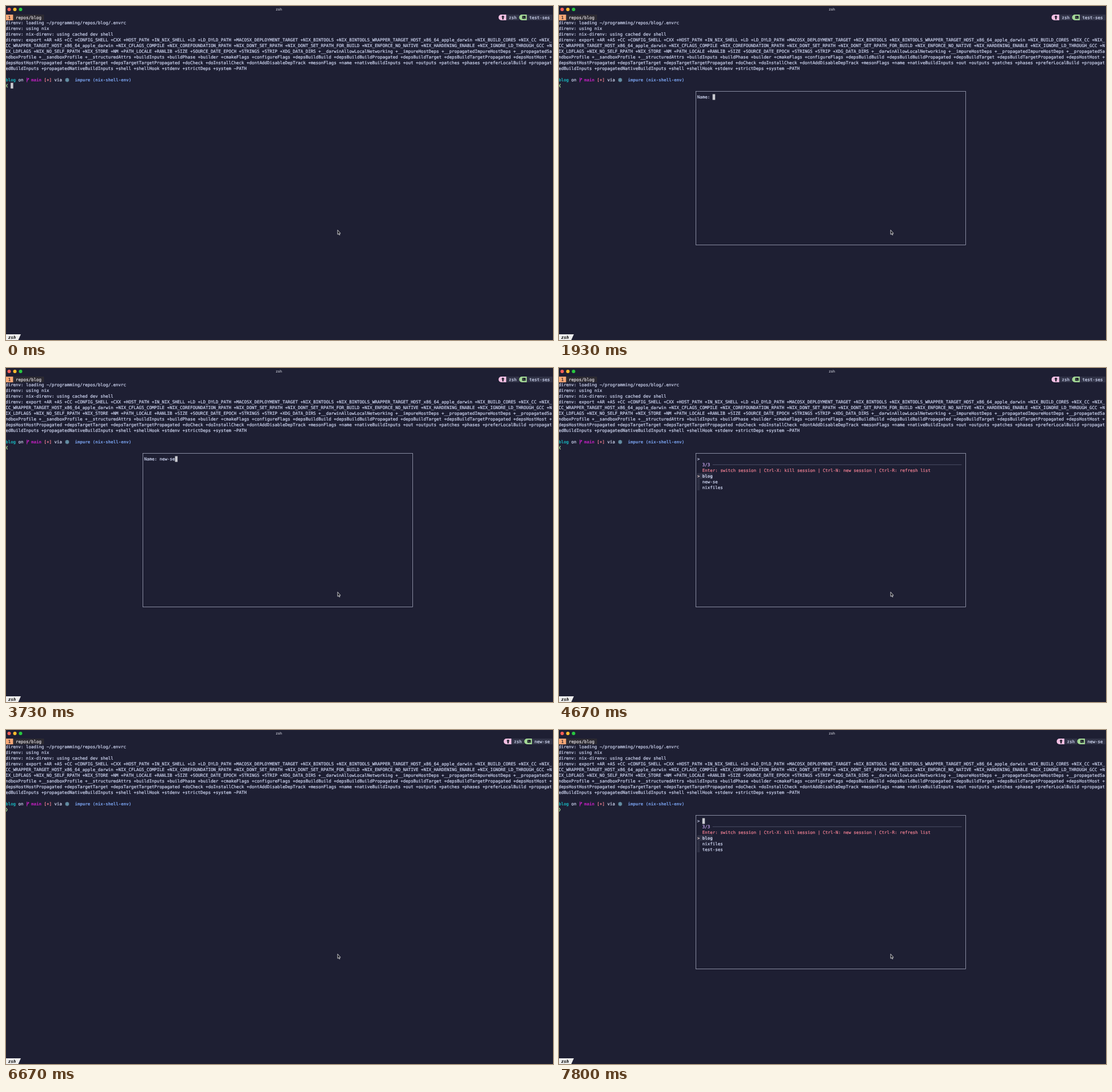
These frames come from a looping animation (957x585 px, 8 s). An HTML page:

```html
<!DOCTYPE html>
<html lang="en">
<head>
<meta charset="utf-8">
<title>Terminal sessions</title>
<style>
html, body { margin: 0; width: 100%; height: 100%; overflow: hidden; background: #1e1f33; }
svg { display: block; width: 957px; height: 585px; }
text { font: 7.462px "DejaVu Sans Mono", "Noto Sans Mono", monospace; white-space: pre; text-rendering: geometricPrecision; }
.cell { stroke-width: .2; }
.b { font-weight: bold; stroke-width: 0; }
.tab { font-weight: bold; font-style: italic; }
.title { font: 600 6.4px Inter, Roboto, sans-serif; }
</style>
</head>
<body>
<svg id="stage" viewBox="0 0 957 585" xmlns="http://www.w3.org/2000/svg">
  <g id="base"></g>
  <g id="live"></g>
  <path id="pointer" d="M580.2 392.3V400.2L581.9 398.6L583 401.2L584.2 400.7L583.1 398.2H585.2Z" fill="#15151c" stroke="#eee" stroke-width=".8"/>
</svg>
<script>
const LOOP = 8000, CW = 4.4925, RH = 9.953;
const C = {
  bg: '#1e1f33', fg: '#d0d7f2', box: '#313347', sel: '#2e3044', gutter: '#2e3044',
  mauve: '#c9a8f0', red: '#f28094', cyan: '#18b4bc', purple: '#c620c4',
  blue: '#7ba4f2', green: '#a4e294', cursor: '#c9cad0', peach: '#f7a877',
  pink: '#f2bfe3', dark: '#191a27', rule: '#565970', border: '#a2a6bc'
};

const X = col => col * CW - .85;
const Y = row => 20.1 + row * RH;

const escapeText = s => s.replace(/&/g, '&amp;').replace(/</g, '&lt;').replace(/>/g, '&gt;');
const text = (col, row, s, fill = C.fg, cls = '') =>
  `<text x="${X(col)}" y="${Y(row) + 2.4}" fill="${fill}" stroke="${fill}" class="cell ${cls}">${escapeText(s)}</text>`;
const rect = (x, y, w, h, fill) =>
  `<rect x="${x}" y="${y}" width="${w}" height="${h}" fill="${fill}"/>`;
const cells = (col, row, n, fill) => rect(X(col), Y(row) - 5, n * CW, 10, fill);
const path = (d, stroke, w, fill = 'none') =>
  `<path d="${d}" stroke="${stroke}" stroke-width="${w}" fill="${fill}"/>`;

const LOG = [
  'direnv: loading ~/programming/repos/blog/.envrc',
  'direnv: using nix',
  'direnv: nix-direnv: using cached dev shell',
  'direnv: export +AR +AS +CC +CONFIG_SHELL +CXX +HOST_PATH +IN_NIX_SHELL +LD +LD_DYLD_PATH +MACOSX_DEPLOYMENT_TARGET +NIX_BINTOOLS +NIX_BINTOOLS_WRAPPER_TARGET_HOST_x86_64_apple_darwin +NIX_BUILD_CORES +NIX_CC +NIX_',
  'CC_WRAPPER_TARGET_HOST_x86_64_apple_darwin +NIX_CFLAGS_COMPILE +NIX_COREFOUNDATION_RPATH +NIX_DONT_SET_RPATH +NIX_DONT_SET_RPATH_FOR_BUILD +NIX_ENFORCE_NO_NATIVE +NIX_HARDENING_ENABLE +NIX_IGNORE_LD_THROUGH_GCC +N',
  'IX_LDFLAGS +NIX_NO_SELF_RPATH +NIX_STORE +NM +PATH_LOCALE +RANLIB +SIZE +SOURCE_DATE_EPOCH +STRINGS +STRIP +XDG_DATA_DIRS +__darwinAllowLocalNetworking +__impureHostDeps +__propagatedImpureHostDeps +__propagatedSa',
  'ndboxProfile +__sandboxProfile +__structuredAttrs +buildInputs +buildPhase +builder +cmakeFlags +configureFlags +depsBuildBuild +depsBuildBuildPropagated +depsBuildTarget +depsBuildTargetPropagated +depsHostHost +',
  'depsHostHostPropagated +depsTargetTarget +depsTargetTargetPropagated +doCheck +doInstallCheck +dontAddDisableDepTrack +mesonFlags +name +nativeBuildInputs +out +outputs +patches +phases +preferLocalBuild +propagat',
  'edBuildInputs +propagatedNativeBuildInputs +shell +shellHook +stdenv +strictDeps +system ~PATH'
];
const HELP = 'Enter: switch session | Ctrl-X: kill session | Ctrl-N: new session | Ctrl-R: refresh list';
const NAME = 'new-se';
const KEYS = [2800, 2930, 3080, 3270, 3470, 3620];

function snowflake(x, y) {
  let d = '';
  for (let i = 0; i < 6; i++) {
    const at = (r, off = 0) => {
      const a = i * Math.PI / 3 + Math.PI / 6 + off;
      return `${x + r * Math.cos(a)} ${y + r * Math.sin(a)}`;
    };
    d += `M${x} ${y}L${at(3.6)}M${at(3.3, .4)}L${at(2)}L${at(3.3, -.4)}`;
  }
  return path(d, '#8fd3ea', .75);
}

function drawBase() {
  const lights = ['#ff5f57', '#febc2e', '#28c840'];
  return lights.map((c, i) => `<circle cx="${5.5 + 10 * i}" cy="6" r="3" fill="${c}"/>`).join('') +
    '<text class="title" x="477.5" y="8" text-anchor="middle" fill="#b3b4bf">zsh</text>' +
    cells(0, 0, 3, C.peach) + text(1, 0, '1', C.dark) +
    cells(3, 0, 12, '#2d2b32') + text(4, 0, 'repos/blog', '#e2dfe4') +
    LOG.map((s, i) => text(0, i + 1, s)).join('') +
    text(0, 11, 'blog', C.cyan, 'b') + text(5, 11, 'on') +
    path('M36.7 125.6V133.4M36.7 131.2C37 129.2 39.2 130 39.2 127.2M38 128L39.2 126.5L40.3 128', C.purple, 1.05) +
    text(10, 11, 'main', C.purple, 'b') + text(15, 11, '[+]', C.red, 'b') +
    text(19, 11, 'via') + snowflake(107, Y(11)) +
    text(27, 11, 'impure (nix-shell-env)', C.blue, 'b') +
    '<path d="M0 575H26L21.5 585H0Z" fill="#eee"/>' +
    '<text class="tab" x="3.7" y="582.6" fill="#000">zsh</text>';
}

function pill(col, fill) {
  const x = X(col), r = X(col + 3);
  return `<path d="M${r} 15H${x + 5}A5 5 0 0 0 ${x + 5} 25H${r}Z" fill="${fill}"/>`;
}

function status(session) {
  const c = 208 - session.length;
  const p = c - 8, ix = X(p + 1) + 3.2, tx = X(c + 1) + 1;
  return cells(p + 3, 0, 5, C.box) + pill(p, C.pink) +
    `<path d="M${ix} 16.4L${ix + 3} 19.5H${ix + 1.2}V23.4H${ix - 1.2}V19.5H${ix - 3}Z" fill="${C.dark}"/>` +
    text(p + 4, 0, 'zsh') +
    cells(c + 3, 0, session.length + 2, C.box) + pill(c, '#a3d796') +
    `<rect x="${tx}" y="17.3" width="6" height="5.2" rx=".7" fill="${C.dark}"/>` +
    path(`M${tx + 1.2} 18.6L${tx + 2.4} 19.8L${tx + 1.2} 21M${tx + 3} 21H${tx + 4.8}`, '#a3d796', .6) +
    text(c + 4, 0, session);
}

function picker(items, picked) {
  const n = items.length;
  let out = text(54, 14, '>') + text(56, 15, `${n}/${n}`, C.mauve) +
    path(`M${X(60)} ${Y(15)}H${X(157)}`, C.rule, .8) + text(56, 16, HELP, C.red);
  items.forEach((name, i) => {
    const row = 17 + i, on = i === picked;
    out += on
      ? cells(54, row, name.length + 2, C.sel) + text(54, row, '>', '#f3d9d6', 'b')
      : cells(54, row, 1, C.gutter);
    out += text(56, row, name, C.fg, on ? 'b' : '');
  });
  return out;
}

const within = (t, a, b) => t >= a && t < b;

function drawLive(t) {
  const switched = t >= 5930;
  let out = status(switched ? NAME : 'test-ses') +
    (switched
      ? path('M.3 136.6L2.2 139.6L.3 142.6', C.green, 1.1)
      : path('M2.6 136.6L.7 139.6L2.6 142.6', C.green, 1.1));

  const open = within(t, 700, 5870) || t >= 7200;
  if (!open) {
    if (t < 330) out += cells(2, 12, 1, C.cursor);
    if (within(t, 5930, 6330) || within(t, 6870, 7200)) out += rect(8, 134.6, .8, 10, C.cursor);
    return out;
  }

  out += `<rect x="239.5" y="149.5" width="472" height="269" fill="${C.bg}" stroke="${C.border}" stroke-width=".8"/>`;
  let col = 56;
  if (within(t, 1930, 4000)) {
    const typed = NAME.slice(0, KEYS.filter(k => t >= k).length);
    out += text(54, 14, 'Name: ' + typed);
    col = 60 + typed.length;
  } else if (within(t, 800, 1930)) {
    out += picker(['blog', 'nixfiles'], 0);
  } else if (within(t, 4070, 5870)) {
    out += picker(['blog', NAME, 'nixfiles'], t < 4930 ? 0 : 1);
  } else if (t >= 7270) {
    out += picker(['blog', 'nixfiles', 'test-ses'], 0);
  } else {
    col = 54;
  }
  const hidden = within(t, 1400, 1870) || within(t, 4530, 4870);
  return hidden ? out : out + cells(col, 14, 1, C.cursor);
}

const live = document.getElementById('live');
let last = '';
function frame(now) {
  const svg = drawLive(now % LOOP);
  if (svg !== last) live.innerHTML = last = svg;
  requestAnimationFrame(frame);
}
document.getElementById('base').innerHTML = drawBase();
frame(0);
</script>
</body>
</html>
```
